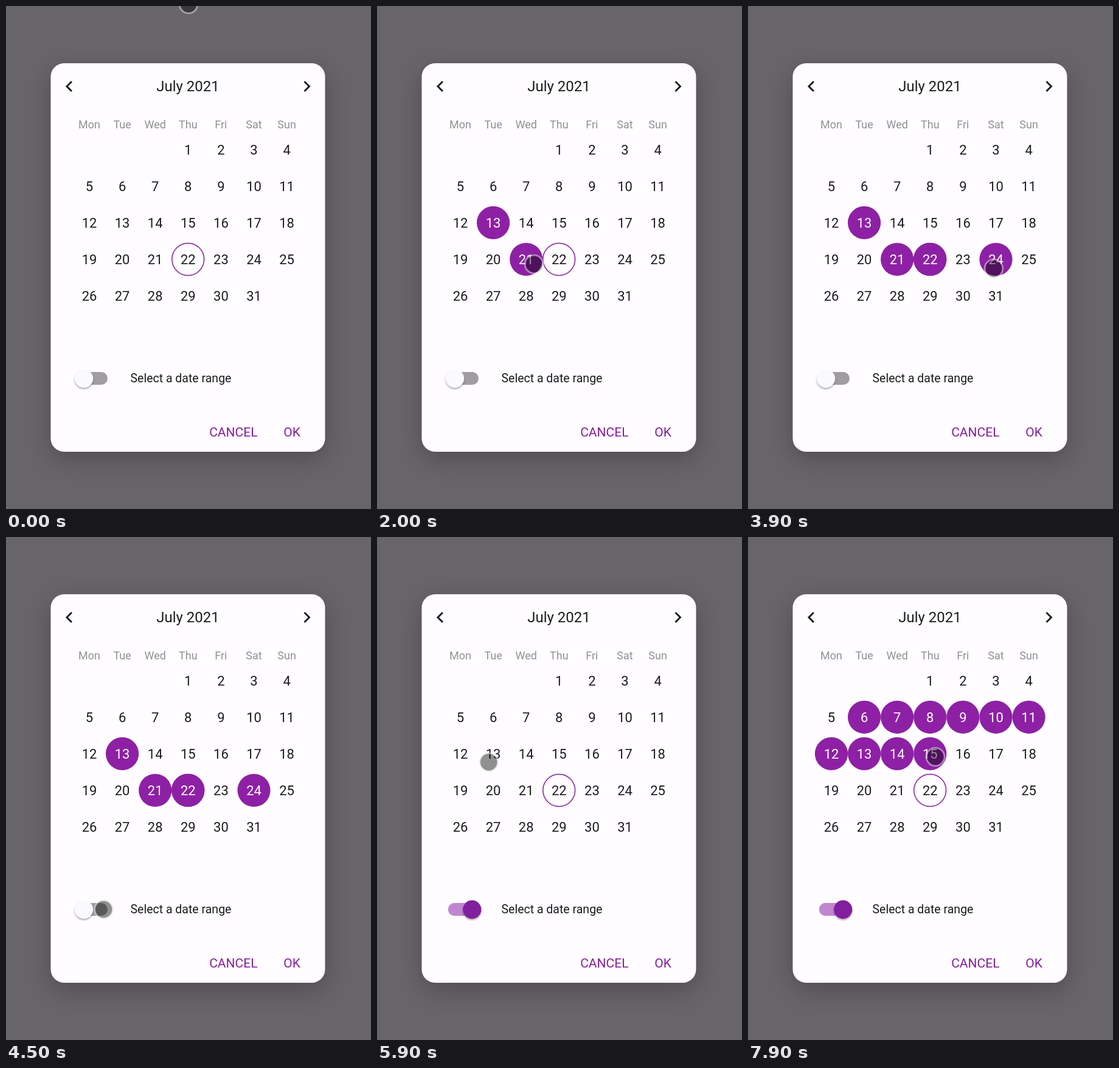
Animation, 600 px wide and 826 px high, one loop 8000 ms. Source, as an HTML page:

```html
<!DOCTYPE html>
<html lang="en">
<head>
<meta charset="utf-8">
<title>Date picker</title>
<style>
  html, body { margin: 0; width: 100%; height: 100%; overflow: hidden; background: #686568; }
  svg { display: block; width: 100vw; height: 100vh; }
  text { font-family: Roboto, Arial, sans-serif; fill: #1c1b1e; }
  .title { font-size: 24px; }
  .weekday { font-size: 18px; fill: #909093; }
  .day { font-size: 22px; }
  .label { font-size: 19.5px; }
  .button { font-size: 21px; fill: #871b9f; }
  .mid { text-anchor: middle; }
  .picked text { fill: #fff; }
  .picked circle { fill: #8e20a5; }
  .chevron { fill: none; stroke: #1c1b1e; stroke-width: 2.9; }
</style>
</head>
<body>
<svg id="stage" viewBox="0 0 600 826">
  <defs>
    <filter id="blur" x="-30%" y="-30%" width="160%" height="160%"><feGaussianBlur stdDeviation="20"/></filter>
    <filter id="soft" x="-50%" y="-50%" width="200%" height="200%"><feGaussianBlur stdDeviation="1.7"/></filter>
  </defs>
  <rect width="600" height="826" fill="#686568"/>
  <rect x="74" y="106" width="451" height="638" rx="22" opacity=".24" filter="url(#blur)"/>
  <rect x="73.5" y="94" width="451" height="638" rx="22" fill="#fffdff"/>

  <path class="chevron" d="M108 124 L100 132 L108 140"/>
  <path class="chevron" d="M490.5 124 L498.5 132 L490.5 140"/>
  <text class="title mid" x="299" y="140.3">July 2021</text>
  <g id="weekdays"></g>
  <g id="days"></g>
  <circle cx="299.2" cy="416" r="26.4" fill="none" stroke="#871b9f" stroke-width="1.5"/>
  <g id="picks"></g>

  <rect x="117" y="601" width="50" height="21" rx="10.5" fill="#9f9d9f"/>
  <rect id="trackOn" x="117" y="601" width="50" height="21" rx="10.5" fill="#c186d0"/>
  <g id="thumb">
    <circle cy="614" r="15" opacity=".36" filter="url(#soft)"/>
    <circle cy="611.7" r="15.2" fill="#faf9fb"/>
    <circle id="thumbOn" cy="611.7" r="15.2" fill="#821f9f"/>
  </g>
  <text class="label" x="204.5" y="618.3">Select a date range</text>
  <text class="button" x="334.2" y="706.5">CANCEL</text>
  <text class="button" x="456.3" y="706.5">OK</text>

  <g id="cursor">
    <circle r="14.2" fill="#000" fill-opacity=".43"/>
    <circle r="14.9" fill="none" stroke="#e6e6e6" stroke-opacity=".5" stroke-width="2.8"/>
  </g>
</svg>
<script>
  const LOOP = 8000, STEP = 100, FADE = 100;
  const TOGGLE_AT = 4600, TOGGLE_MS = 200, RANGE_AT = 7150;

  const $ = id => document.getElementById(id);
  const clamp = v => Math.max(0, Math.min(1, v));
  const ramp = (t, start, ms) => clamp((t - start) / ms);
  const smooth = p => p * p * (3 - 2 * p);
  const easeOut = p => 1 - (1 - p) ** 3;

  function add(parent, tag, attrs, content = "") {
    const el = document.createElementNS("http://www.w3.org/2000/svg", tag);
    for (const name in attrs) el.setAttribute(name, attrs[name]);
    el.textContent = content;
    return parent.appendChild(el);
  }

  const columnX = i => 137 + 54.1 * i;
  // The month starts on a Thursday.
  const cell = day => ({ x: columnX((day + 2) % 7), y: 235.7 + 60.1 * Math.floor((day + 2) / 7) });

  ["Mon", "Tue", "Wed", "Thu", "Fri", "Sat", "Sun"].forEach((name, i) =>
    add($("weekdays"), "text", { class: "weekday mid", x: columnX(i), y: 201.3 }, name));

  function dayText(parent, day) {
    const { x, y } = cell(day);
    add(parent, "text", { class: "day mid", x, y: y + 8 }, day);
  }
  for (let day = 1; day <= 31; day++) dayText($("days"), day);

  const picks = [];
  function pick(day, start, end) {
    const { x, y } = cell(day);
    const group = add($("picks"), "g", { class: "picked" });
    add(group, "circle", { cx: x, cy: y, r: 27.1 });
    dayText(group, day);
    picks.push({ group, start, end });
  }
  pick(13, 1050, TOGGLE_AT);
  pick(21, 1900, TOGGLE_AT);
  pick(22, 2350, TOGGLE_AT);
  pick(24, 3250, TOGGLE_AT);
  pick(6, 6350, LOOP);
  for (let day = 7; day <= 15; day++) pick(day, RANGE_AT, LOOP);

  // time, x, y, easing towards the next point
  const path = [
    [0, 300, -3, smooth],
    [780, 187, 355, smooth],
    [1250, 188, 356, smooth],
    [1800, 258, 424, smooth],
    [2000, 258, 424, smooth],
    [2250, 296, 420, smooth],
    [2450, 296, 420, smooth],
    [2850, 392, 419, smooth],
    [3100, 417.5, 421, smooth],
    [3800, 417.5, 421, smooth],
    [4520, 160, 612, smooth],
    [5200, 153, 614, smooth],
    [5350, 153, 614, smooth],
    [6150, 193, 296, smooth],
    [6350, 193, 296, easeOut],
    [7026, 308, 361, smooth],
    [LOOP, 308, 361, smooth]
  ];

  function cursorAt(t) {
    const next = path.findIndex(point => point[0] > t);
    const [t0, x0, y0, ease] = path[next - 1];
    const [t1, x1, y1] = path[next];
    const p = ease((t - t0) / (t1 - t0));
    return [x0 + (x1 - x0) * p, y0 + (y1 - y0) * p];
  }

  function draw(t) {
    for (const { group, start, end } of picks) {
      group.setAttribute("opacity", ramp(t, start, FADE) * (1 - ramp(t, end, FADE)));
    }
    const on = smooth(ramp(t, TOGGLE_AT, TOGGLE_MS));
    $("trackOn").setAttribute("opacity", on);
    $("thumbOn").setAttribute("opacity", on);
    $("thumb").setAttribute("transform", `translate(${128 + 28.2 * on} 0)`);
    $("cursor").setAttribute("transform", `translate(${cursorAt(t)})`);
  }

  const began = performance.now();
  function tick() {
    const t = (performance.now() - began) % LOOP;
    draw(Math.floor(t / STEP) * STEP);
    requestAnimationFrame(tick);
  }
  tick();
</script>
</body>
</html>
```
